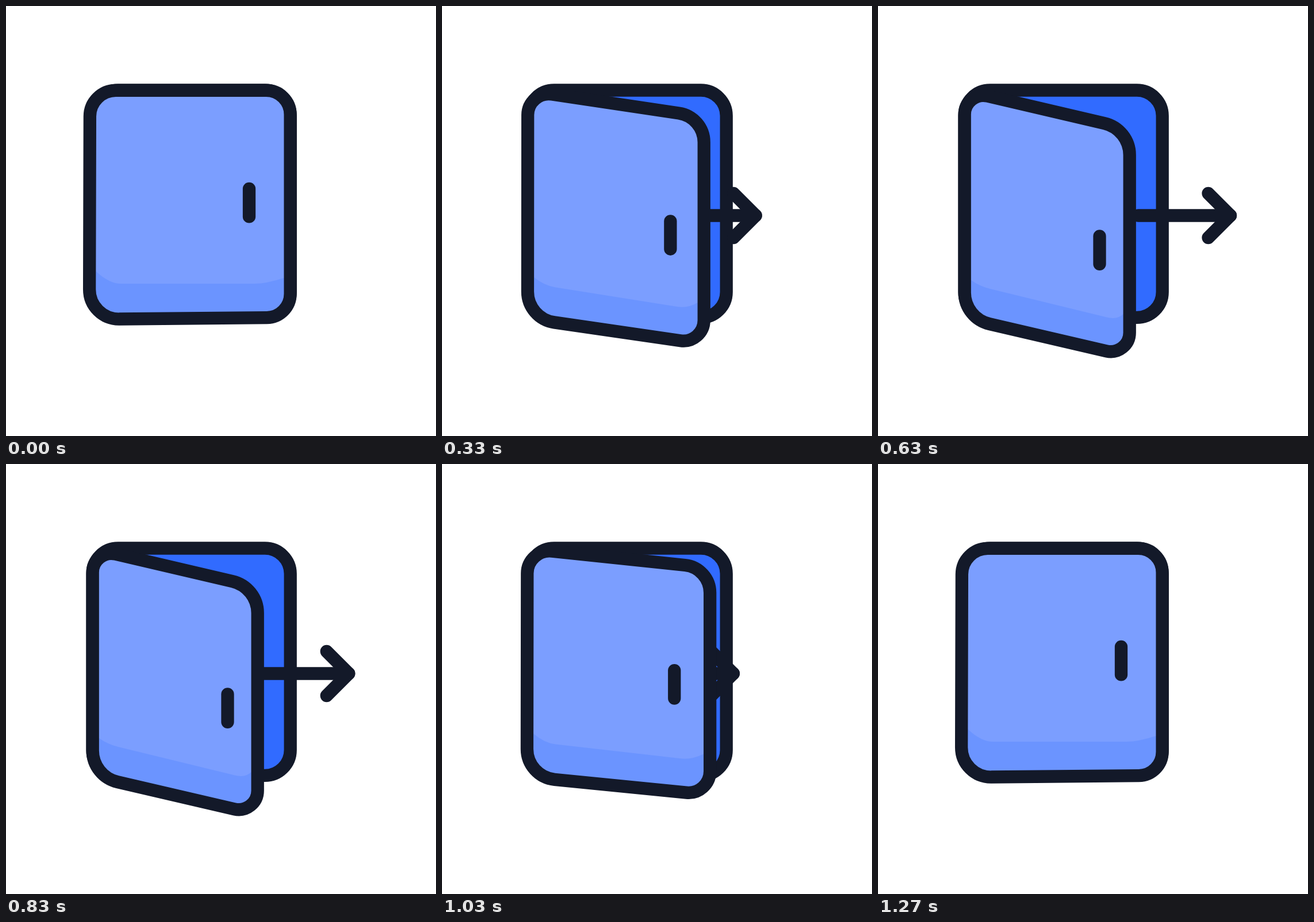
These frames come from a looping animation (748 px wide and 748 px high, 1.33 s). An HTML page with a canvas:

```html
<!DOCTYPE html>
<html lang="en">
<head>
<meta charset="utf-8">
<title>Door</title>
<style>
  html, body { margin: 0; width: 100%; height: 100%; overflow: hidden; background: #fff; }
  canvas { display: block; width: 748px; height: 748px; }
</style>
</head>
<body>
<canvas id="stage" width="748" height="748"></canvas>
<script>
const ctx = document.getElementById('stage').getContext('2d');
const INK = '#131929', LIGHT = '#7b9eff', SHADE = '#6b94ff', INSIDE = '#316bff';
const LOOP = 1330, STEPS = 40;

const clamp = x => Math.min(1, Math.max(0, x));
const mix = (a, b, p) => a + (b - a) * p;
const smooth = x => { x = clamp(x); return x * x * (3 - 2 * x); };
const easeOut = x => x * (2 - x);

// 0 is shut, 1 is open; n counts drawing steps.
function doorAmount(n) {
  return n < 20 ? smooth(n / 16) : 1 - smooth((n - 25) / 12);
}

function arrowShift(n) {
  const peak = 21.5, u = n / peak;
  const p = n < peak
    ? mix(smooth(u), easeOut(u), .55)
    : 1 - smooth((n - peak) / 16.25);
  return mix(-171.6, 5, p);
}

// Door corners for a swing of p: position and rounding length.
function doorCorners(p) {
  const corner = (x0, x1, y0, y1, cut0, cut1) =>
    ({ x: mix(x0, x1, p), y: mix(y0, y1, p), cut: mix(cut0, cut1, p) });
  return [
    corner(146, 150.7, 147, 147.4, 45, 41),
    corner(494.6, 437.7, 146.7, 214.3, 42, 45),
    corner(494.6, 437.7, 541.8, 609.7, 41, 41.5),
    corner(145, 150.7, 545, 543, 52, 44.5)
  ];
}

// Closed outline whose corners are rounded by near-circular curves.
function roundedShape(corners) {
  const path = new Path2D();
  corners.forEach((c, i) => {
    const heading = d => {
      const o = corners[(i + d + 4) % 4];
      const len = Math.hypot(o.x - c.x, o.y - c.y);
      return [(o.x - c.x) / len, (o.y - c.y) / len];
    };
    const back = heading(-1), ahead = heading(1);
    const turn = Math.PI - Math.acos(back[0] * ahead[0] + back[1] * ahead[1]);
    const pull = 1 - 4 / 3 * Math.tan(turn / 4) / Math.tan(turn / 2);
    const along = (dir, d) => [c.x + dir[0] * d, c.y + dir[1] * d];
    path.lineTo(...along(back, c.cut));
    path.bezierCurveTo(...along(back, c.cut * pull), ...along(ahead, c.cut * pull), ...along(ahead, c.cut));
  });
  path.closePath();
  return path;
}

// Everything above the shaded strip; the door outline trims the rest.
function lightPanel(p) {
  const point = (x0, x1, y0, y1) => [mix(x0, x1, p), mix(y0, y1, p)];
  const a = point(156, 162, 461, 477), b = point(200, 195, 483, 492);
  const c = point(432, 398, 483, 541.5), d = point(483.5, 426.5, 473, 536);
  const beyond = (from, to) => to.map((v, i) => v + (v - from[i]) * .09);
  const path = new Path2D();
  path.moveTo(120, 120);
  path.lineTo(120, a[1] - 30);
  path.lineTo(...a);
  path.quadraticCurveTo(...beyond(c, b), ...b);
  path.lineTo(...c);
  path.quadraticCurveTo(...beyond(b, c), ...d);
  path.lineTo(520, d[1] - 20);
  path.lineTo(520, 120);
  return path;
}

function line(...pts) {
  ctx.beginPath();
  for (let i = 0; i < pts.length; i += 2) ctx.lineTo(pts[i], pts[i + 1]);
  ctx.stroke();
}

function drawFrame() {
  ctx.beginPath();
  ctx.roundRect(150.5, 146.5, 344.2, 395.4, 44.5);
  ctx.fillStyle = INSIDE;
  ctx.fill();
  ctx.stroke();
}

function drawArrow(dx) {
  const tip = 612.3 + dx, mid = 364.5, head = 38.5;
  line(452 + dx, mid, tip, mid);
  line(tip - head, mid - head, tip, mid, tip - head, mid + head);
}

function drawDoor(p) {
  const door = roundedShape(doorCorners(p));
  ctx.fillStyle = SHADE;
  ctx.fill(door);
  ctx.save();
  ctx.clip(door);
  ctx.fillStyle = LIGHT;
  ctx.fill(lightPanel(p));
  ctx.restore();
  ctx.stroke(door);

  const x = mix(423, 385.5, p), y = mix(342.2, 424.6, p);
  line(x, y - 24.2, x, y + 24.2);
}

function draw(time) {
  const n = Math.min(STEPS - 1, Math.floor((time % LOOP + 4) * STEPS / LOOP));
  ctx.fillStyle = '#fff';
  ctx.fillRect(0, 0, 748, 748);
  ctx.strokeStyle = INK;
  ctx.lineWidth = 22.3;
  ctx.lineCap = ctx.lineJoin = 'round';
  drawFrame();
  drawArrow(arrowShift(n));
  drawDoor(doorAmount(n));
}

let start;
function tick(now) {
  start ??= now;
  draw(now - start);
  requestAnimationFrame(tick);
}
draw(0);
requestAnimationFrame(tick);
</script>
</body>
</html>
```
